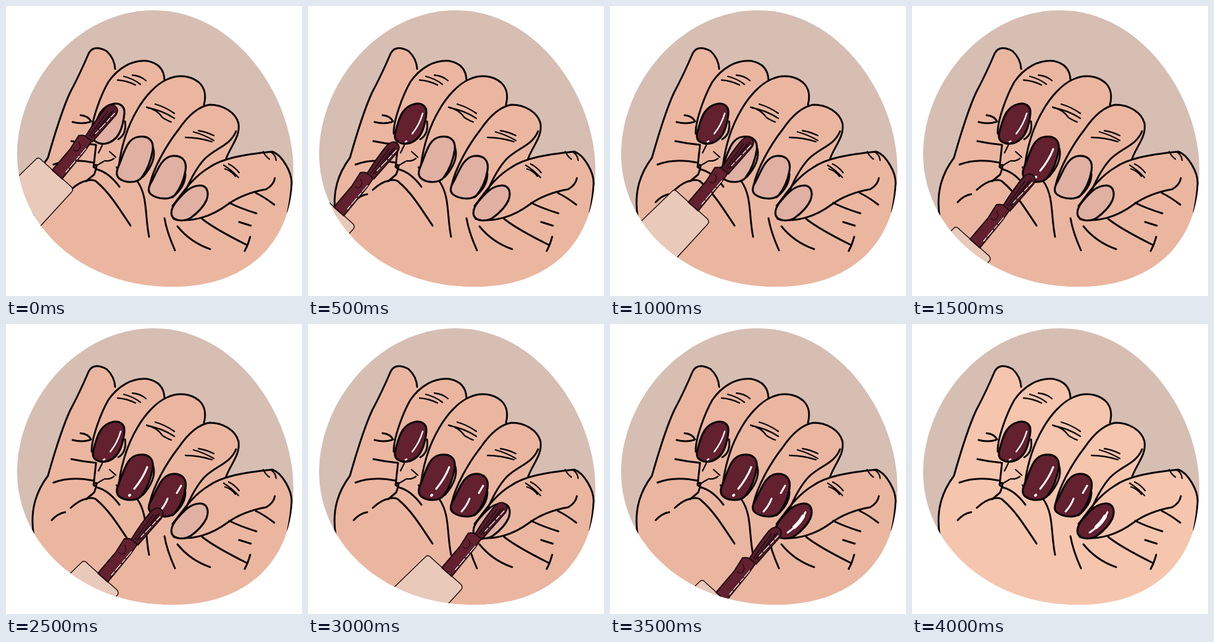
Recreate the animation shown at these times as an HTML page. Size 480 by 470 pixels, loop 4500 ms.

```html
<!DOCTYPE html>
<html lang="en">
<head>
<meta charset="utf-8">
<title>Nail painting</title>
<style>
  html, body { margin: 0; width: 100%; height: 100%; overflow: hidden; background: #fff; }
  svg { display: block; }
  .ink { fill: none; stroke: #090607; stroke-width: 3; stroke-linecap: round; stroke-linejoin: round; }
  .thin { stroke-width: 2.3; }
  .nail > path { stroke: #090607; stroke-width: 3.2; }
  .shine { fill: none; stroke: #fff; stroke-linecap: round; }
</style>
</head>
<body>
<svg width="480" height="470" viewBox="0 0 480 470">
  <clipPath id="blob"><path d="M240 7C372 7 466 147 466 265C466 390 385 455 270 455C120 455 18 354 18 240C18 126 114 7 240 7Z"/></clipPath>
  <g clip-path="url(#blob)">
    <rect width="480" height="470" fill="#d6beb3"/>
    <path id="skin" d="M45 343C38 300 50 270 68 246C76 218 90 170 104 140Q120 110 134 77C140 65 152 67 163 73Q178 86 177 105C190 94 210 87 229 89Q256 94 257 121C270 112 294 111 310 122Q327 136 322 160C343 159 366 167 375 183C385 207 366 224 357 247Q390 240 432 236C447 241 465 270 463 290Q462 310 457 334L470 470H0V390Z"/>

    <g class="ink">
      <path d="M45 343C38 300 50 270 68 246C76 218 90 170 104 140Q120 110 134 77C140 65 152 67 163 73Q176 85 177 102"/>
      <path d="M139 207C138 186 154 144 166 123C182 100 205 87 229 89Q256 94 257 120"/>
      <path d="M183 259C187 228 197 195 213 168C225 147 243 127 261 119C280 110 300 113 313 124Q327 137 321 160"/>
      <path d="M233 290C239 264 258 228 280 200C295 178 311 163 330 160C352 160 372 172 377 190C380 212 366 224 357 247"/>
      <path d="M373 203C364 226 340 230 322 248Q306 265 291 300"/>
      <path d="M270 324C286 304 302 278 329 262C350 247 383 241 432 236C447 241 465 270 463 290Q462 310 457 334"/>
      <path d="M272 345C302 352 335 340 359 322C381 306 405 300 422 297Q434 290 436 279"/>
      <path d="M193 187Q196 208 182 216M239 231Q244 252 222 277M291 272Q291 293 270 310"/>
      <path d="M405 303Q418 309 435 322M362 319Q380 328 406 336M378 350L397 356M318 345Q338 361 390 387M396 374Q393 384 391 389L387 397"/>
      <path d="M278 357Q299 383 331 394M257 344Q261 367 274 396M213 284C230 308 225 339 232 374"/>
      <path d="M74 318Q84 307 96 305M105 298Q119 285 131 283Q143 280 148 286C168 303 182 326 202 356"/>
      <path d="M106 219Q125 223 146 225L142 261L148 265Q167 270 184 293M77 257Q105 246 143 254M142 260Q151 251 143 273L130 284"/>
      <path d="M108 188Q123 192 136 188M121 177Q133 178 138 187"/>
    </g>
    <g class="ink thin">
      <path d="M181 120Q196 121 210 128M191 114Q207 118 218 127M205 112Q218 113 227 121"/>
      <path d="M228 164Q244 167 254 181Q262 186 268 188M230 165Q253 169 273 182M242 159Q259 164 273 174"/>
      <path d="M291 213Q312 213 334 220M304 204Q322 209 337 218M312 202Q325 204 337 210"/>
      <path d="M353 258Q366 266 377 278M355 264Q365 267 372 276M361 256Q371 261 378 270M417 236Q421 244 427 248M428 236Q437 240 438 250"/>
      <path d="M150 238L156 226M168 236L178 245M160 251Q169 252 175 247M148 258L158 252M179 261Q184 275 196 284"/>
    </g>
    <g id="nails"></g>

    <g id="brush">
      <path d="M50 247Q54 245 59 251L106 293Q110 298 106 302L38 376L-42 336Z" fill="#e9c9ba" stroke="#1b0d10" stroke-width="1.5"/>
      <path d="M75 266L104 232L118 210Q131 207 139 219L128 235L91 280Z" fill="#63202f" stroke="#1b0a10" stroke-width="2"/>
      <path d="M129 211Q146 184 161 166Q170 157 177 162Q184 168 178 177L140 220Z" fill="#571d2b" stroke="#1b0a10" stroke-width="2"/>
      <path fill="none" stroke="#1b0a10" stroke-width="1.3" d="M135 211L165 171M138 213L171 171M142 212L175 169M109 232Q116 240 121 227L118 220"/>
      <path class="shine" stroke-width="1.2" stroke-dasharray="7 3 13 4" d="M97 269L132 228M145 207L176 174"/>
    </g>
  </g>
</svg>
<script>
  const nailShapes = [
    { outline: "M172 159C184 156 193 162 192 174C190 192 186 206 178 214C168 224 155 226 146 220C138 216 141 206 144 196C149 178 155 163 172 159Z",
      shine: [["M186 174Q181 192 169 207", 2.4], ["M158 220L160 219", 2.5]] },
    { outline: "M215 212C230 210 240 217 238 233C235 252 229 266 220 278C212 288 192 287 183 279C177 273 180 265 184 256C192 236 197 214 215 212Z",
      shine: [["M229 232Q222 250 208 267", 3.2], ["M200 278L201 277", 4]] },
    { outline: "M270 243C285 242 294 250 291 267C288 284 282 296 274 306C266 315 246 313 236 306C229 301 231 293 236 285C246 266 252 245 270 243Z",
      shine: [["M284 262L277 274", 3], ["M262 283Q258 294 249 304", 3]] },
    { outline: "M313 291C326 290 330 302 325 315C320 326 311 335 300 343C289 350 273 349 269 340C266 331 271 323 278 315C288 303 298 292 313 291Z",
      shine: [["M317 305Q309 324 288 338", 3], ["M313 312Q308 321 299 329", 6]] }
  ];
  // Brush offset for each half-second pose; the last pose has no brush.
  const brushOffsets = [[0, 0], [-33, 60], [52, 52], [19, 112], [107, 78], [74, 138], [142, 129], [97, 169]];
  const STEP = 500, POSES = 9;

  const byId = id => document.getElementById(id);
  byId("nails").innerHTML = nailShapes.map(({ outline, shine }) =>
    `<g class="nail"><path d="${outline}"/><g class="shine">${
      shine.map(([d, width]) => `<path d="${d}" stroke-width="${width}"/>`).join("")
    }</g></g>`).join("");
  const nails = [...document.querySelectorAll(".nail")];

  function draw(pose) {
    const offset = brushOffsets[pose];
    const paintedCount = Math.ceil(pose / 2);
    byId("skin").setAttribute("fill", offset ? "#ebb6a0" : "#f6c5ae");
    byId("brush").style.display = offset ? "" : "none";
    if (offset) byId("brush").setAttribute("transform", `translate(${offset})`);
    nails.forEach((nail, i) => {
      const painted = i < paintedCount;
      nail.firstChild.setAttribute("fill", painted ? "#63202f" : "#e0b0a2");
      nail.lastChild.style.display = painted ? "" : "none";
    });
  }

  const start = performance.now();
  function tick() {
    draw(Math.floor((performance.now() - start) / STEP) % POSES);
    requestAnimationFrame(tick);
  }
  tick();
</script>
</body>
</html>
```
